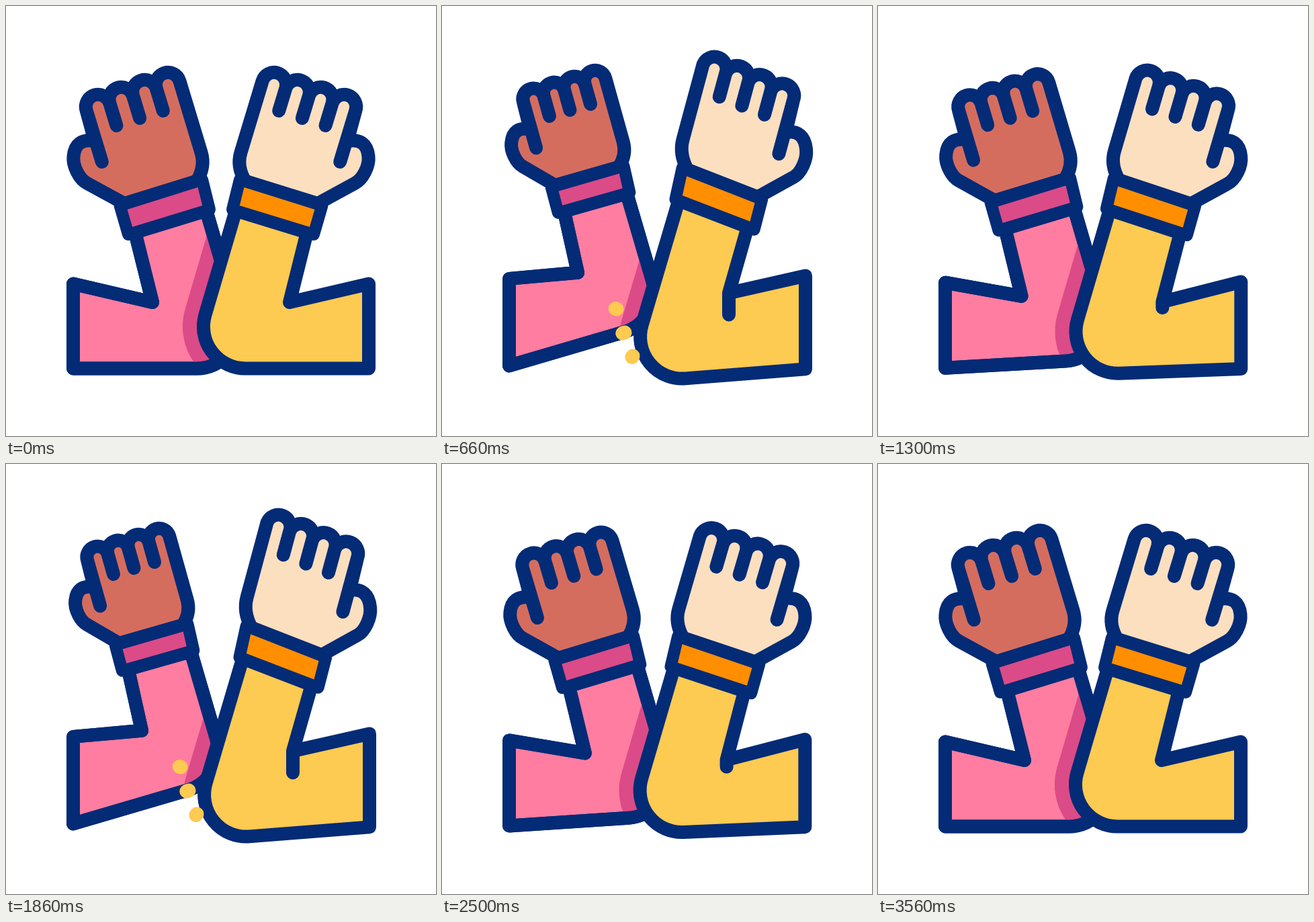
Animation, 640 px wide and 640 px high, one loop 3600 ms. Source, as an HTML page with a canvas:

```html
<!DOCTYPE html>
<html lang="en">
<head>
<meta charset="utf-8">
<title>Elbow bump</title>
<style>
  html, body { margin: 0; width: 100%; height: 100%; overflow: hidden; background: #fff; }
  canvas { display: block; width: 640px; height: 640px; }
</style>
</head>
<body>
<canvas id="stage" width="640" height="640"></canvas>
<script>
const ctx = document.getElementById('stage').getContext('2d');
const NAVY = '#042b76', YELLOW = '#fdca52';

// Both arms share one right-hand drawing; the left one is mirrored.
// Leaning moves hand and cuff by shift + skew, and the sleeve joints by their own offsets.
const RIGHT = {
  skin: '#fcdfbf', cuff: '#ff8f00', sleeve: YELLOW,
  shift: [6.7, -2.7], skewX: [-0.035, 0.048], skewY: [0.01, 0.06],
  elbow: [-1, 38], crook: [5, 30], fold: [5, -2.5], shoulder: [1, -11], hem: [1, 2]
};
const LEFT = {
  mirrored: true, skin: '#d56d5f', cuff: '#db4b87', sleeve: '#ff7da1', shade: '#db4b87',
  shift: [11.3, -10], skewX: [-0.125, -0.022], skewY: [0.015, -0.115],
  elbow: [37, -56], crook: [16, -33], fold: [16, -33], shoulder: [0, -6.5], hem: [0, -3]
};

const WOUND = { lean: 1.73, lift: 0 };
const BUMP = { lean: -0.15, lift: 29 };
const REST = { lean: 0, lift: 0 };

function ease(u) {
  u = Math.min(1, Math.max(0, u));
  return u * u * (3 - 2 * u);
}

function mix(a, b, u) {
  const s = ease(u);
  return { lean: a.lean + (b.lean - a.lean) * s, lift: a.lift + (b.lift - a.lift) * s };
}

// Wind up, hold, bump, settle; the last wind-up is slightly shorter.
function poseAt(t) {
  const cycle = Math.floor(t / 1200);
  const local = t - cycle * 1200;
  const windUp = cycle === 2 ? 367 : 400;
  const release = local - windUp - 133;
  const pose = release < 0 ? mix(REST, WOUND, local / windUp)
    : release < 300 ? mix(WOUND, BUMP, release / 300)
    : mix(BUMP, REST, (release - 300) / 367);
  return { ...pose, release };
}

function joint(x, y, [dx, dy], pose, weight = 1) {
  return [x + dx * pose.lean, y + dy * pose.lean - pose.lift * weight];
}

function bender(arm, pose) {
  return (x, y) => joint(x, y, arm.shift.map(
    (d, i) => d + arm.skewX[i] * (x - 430) + arm.skewY[i] * (y - 250)), pose);
}

function sleevePath(arm, pose) {
  const bend = bender(arm, pose);
  const hem = joint(540, 539.5, arm.hem, pose, 0.1);
  const fold = joint(422, 441, arm.fold, pose);
  const path = new Path2D();
  path.moveTo(...bend(342, 304.5));
  path.arcTo(...joint(273, 539.5, arm.elbow, pose, 1.4), ...hem, 62.3);
  path.lineTo(...hem);
  path.lineTo(...joint(540, 413.5, arm.shoulder, pose, 0.1));
  path.lineTo(...fold);
  path.lineTo(...bend(448, 337));
  path.closePath();
  path.moveTo(...fold);
  path.lineTo(...joint(422, 441, arm.crook, pose));
  return path;
}

function cuffPath(arm, pose) {
  const bend = bender(arm, pose);
  const path = new Path2D();
  path.moveTo(...bend(348, 258.5));
  path.lineTo(...bend(470.5, 297));
  path.lineTo(...bend(458, 340));
  path.lineTo(...bend(337, 303));
  path.closePath();
  return path;
}

function handPath(arm, pose) {
  const bend = bender(arm, pose);
  const knuckle = (i, down = 0) =>
    bend(381.6 + 34.7 * i - 0.29 * down, 111.6 + 10.95 * i + 0.957 * down);
  const path = new Path2D();
  path.moveTo(...bend(356, 260.5));
  path.quadraticCurveTo(...bend(343, 239), ...bend(349.5, 218));
  path.lineTo(...knuckle(0));
  for (let i = 0; i < 4; i++) {
    const [ax, ay] = knuckle(i), [bx, by] = knuckle(i + 1);
    const angle = Math.atan2(by - ay, bx - ax);
    path.arc((ax + bx) / 2, (ay + by) / 2, Math.hypot(bx - ax, by - ay) / 2, angle + Math.PI, angle);
  }
  path.lineTo(...bend(508, 201));
  path.quadraticCurveTo(...bend(537, 196), ...bend(539.5, 224));
  path.bezierCurveTo(...bend(541, 238), ...bend(531, 258), ...bend(519, 264));
  path.lineTo(...bend(464, 294));
  path.closePath();
  for (let i = 1; i <= 4; i++) {
    path.moveTo(...knuckle(i));
    path.lineTo(...knuckle(i, i < 4 ? 35 : 80));
  }
  return path;
}

function outline(path, color, width) {
  ctx.strokeStyle = color;
  ctx.lineWidth = width;
  ctx.stroke(path);
}

function paint(path, color, width = 20) {
  ctx.fillStyle = color;
  ctx.fill(path);
  outline(path, NAVY, width);
}

function flip() {
  ctx.translate(640, 0);
  ctx.scale(-1, 1);
}

function drawArm(arm, pose) {
  ctx.save();
  if (arm.mirrored) flip();
  paint(handPath(arm, pose), arm.skin);
  const sleeve = sleevePath(arm, pose);
  paint(sleeve, arm.sleeve);
  if (arm.shade) {
    // Shadow cast by the arm in front
    ctx.save();
    ctx.clip(sleeve);
    flip();
    outline(sleevePath(RIGHT, pose), arm.shade, 62);
    ctx.restore();
    outline(sleeve, NAVY, 20);
  }
  paint(cuffPath(arm, pose), arm.cuff, 18);
  ctx.restore();
}

function drawSparks(release) {
  const head = ease((release - 100) / 200);
  const tail = ease((release - 200) / 200);
  if (head <= 0 || tail >= 1) return;
  for (let i = 0; i < 3; i++) {
    const angle = (193 - 33 * i) * Math.PI / 180;
    const reach = i === 1 ? 64 : 37;
    const along = u => [260 + 12 * i + Math.cos(angle) * reach * u, 451 + 35 * i + Math.sin(angle) * reach * u];
    const path = new Path2D();
    path.moveTo(...along(tail));
    path.lineTo(...along(head));
    outline(path, YELLOW, 21);
  }
}

function draw() {
  const pose = poseAt(performance.now() % 3600);
  ctx.fillStyle = '#fff';
  ctx.fillRect(0, 0, 640, 640);
  ctx.lineCap = ctx.lineJoin = 'round';
  drawArm(LEFT, pose);
  drawArm(RIGHT, pose);
  drawSparks(pose.release);
  requestAnimationFrame(draw);
}
draw();
</script>
</body>
</html>
```
